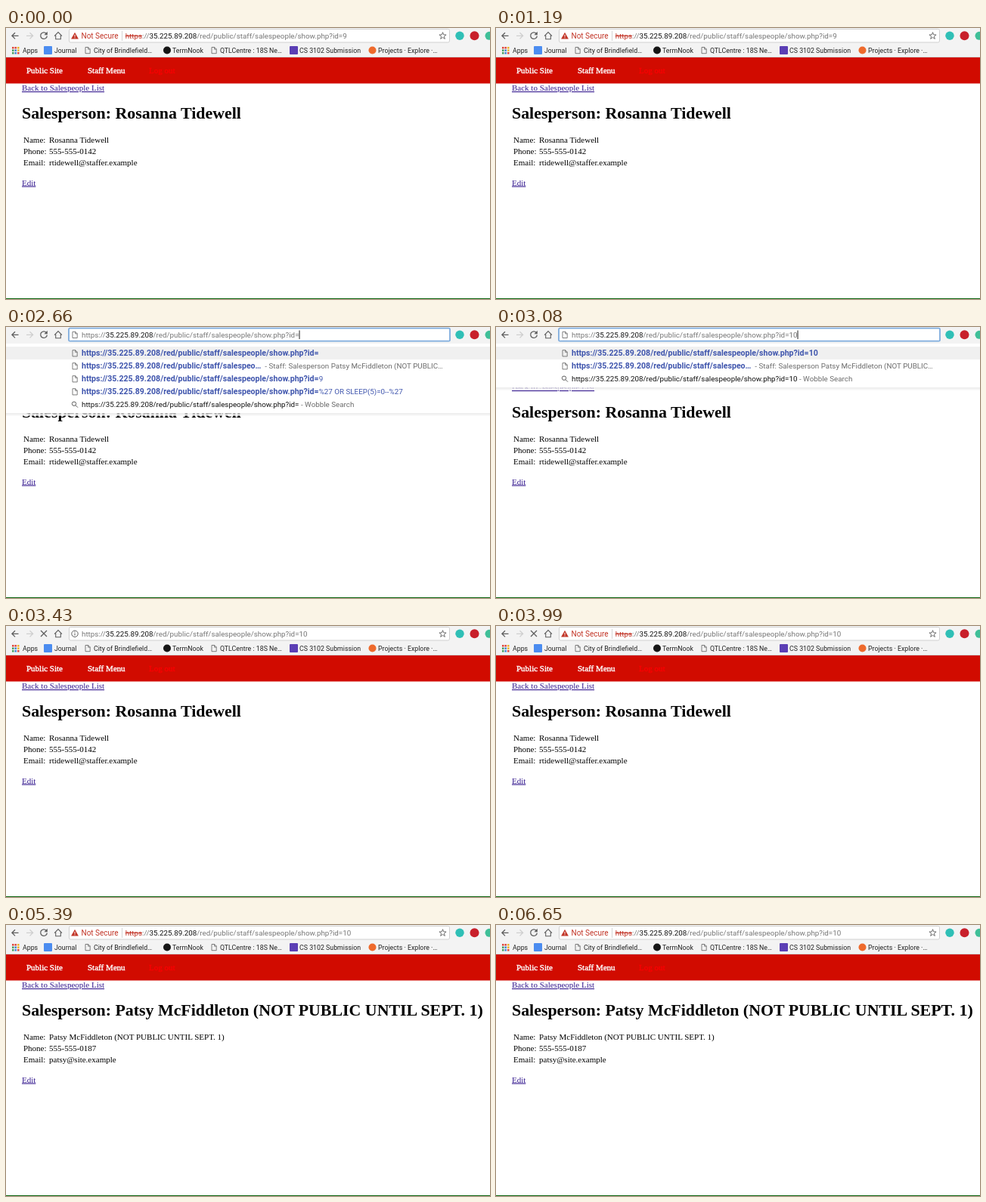
An HTML page for the animation above (6.72 s loop, 640x359 px).

```html
<!DOCTYPE html>
<html lang="en">
<head>
<meta charset="utf-8">
<title>Salesperson lookup</title>
<style>
  html, body { margin: 0; width: 100%; height: 100%; overflow: hidden; background: #fff; }
  svg { display: block; width: 100vw; height: 100vh; }
  text { white-space: pre; }
  .ui { font-family: Roboto, Inter, "Liberation Sans", sans-serif; font-size: 9.8px; }
  .mark { font-size: 8.8px; fill: #222; }
  .page { font-family: "Liberation Serif", "Noto Serif", serif; font-size: 11px; fill: #000; }
  .title { font-size: 21.9px; font-weight: bold; }
  .link { fill: #351a8f; text-decoration: underline; }
  .menu { fill: #fff; stroke: #fff; stroke-width: .4; }
  .hit { font-size: 10.6px; font-weight: bold; }
  .line { fill: none; stroke: #5f5f5f; stroke-width: 1.3; }
</style>
</head>
<body>
<svg viewBox="0 0 640 359" preserveAspectRatio="none">
  <rect width="640" height="359" fill="#fff"/>
  <g id="page"></g>
  <rect y="358" width="640" height="1" fill="#0c650f"/>
  <g id="chrome"></g>
</svg>
<script>
const LOOP = 6720;
const HOST = '35.225.89.208';
const FOLDER = '/red/public/staff/salespeople/';
const PATH = FOLDER + 'show.php?id=';
const BASE = 'https://' + HOST + PATH;

const people = [
  { name: 'Rosanna Tidewell', phone: '555-555-0142', email: 'rtidewell@staffer.example' },
  { name: 'Patsy McFiddleton (NOT PUBLIC UNTIL SEPT. 1)', phone: '555-555-0187', email: 'patsy@site.example' }
];

// Each step holds until the next one starts.
const steps = [
  { at: 0,    id: '9',  mode: 'insecure', person: 0 },
  { at: 1680, id: '9',  mode: 'insecure', person: 0, focus: true },
  { at: 2380, id: '',   mode: 'typing',   person: 0, focus: true },
  { at: 2870, id: '1',  mode: 'typing',   person: 0, focus: true },
  { at: 3010, id: '10', mode: 'typing',   person: 0, focus: true },
  { at: 3220, id: '10', mode: 'info',     person: 0, loading: true },
  { at: 3640, id: '10', mode: 'insecure', person: 0, loading: true },
  { at: 4480, id: '10', mode: 'insecure', person: 1 }
];

const text = (x, y, s, cls = 'ui', extra = '') =>
  `<text x="${x}" y="${y}" class="${cls}" ${extra}>${s}</text>`;
const span = (s, fill, extra = '') => `<tspan fill="${fill}" ${extra}>${s}</tspan>`;
const rect = (x, y, w, h, fill, extra = '') =>
  `<rect x="${x}" y="${y}" width="${w}" height="${h}" fill="${fill}" ${extra}/>`;
const dot = (x, y, r, fill) => `<circle cx="${x}" cy="${y}" r="${r}" fill="${fill}"/>`;
const line = (d, extra = '') => `<path class="line" d="${d}" ${extra}/>`;
const sheet = (x, y) =>
  line(`M${x - 3} ${y - 4}h3.8l2.4 2.4v5.8h-6.2zM${x + .6} ${y - 4}v2.6h2.6`, 'style="stroke-width:.8"');

function drawPage({ person }) {
  const { name, phone, email } = people[person];
  const rows = [['Name:', name], ['Phone:', phone], ['Email:', email]];
  return rect(0, 39, 640, 34.5, '#d10b00') +
    text(27, 60, 'Public Site', 'page menu') +
    text(108, 60, 'Staff Menu', 'page menu') +
    text(189, 60, 'Log out', 'page', 'style="fill:#fb0000;stroke:#fb0000;stroke-width:.3"') +
    text(21, 83, 'Back to Salespeople List', 'page link') +
    text(21, 119.5, 'Salesperson: ' + name, 'page title') +
    rows.map(([label, value], i) =>
      text(23, 152 + 15 * i, label, 'page') + text(57, 152 + 15 * i, value, 'page')).join('') +
    text(21, 208.5, 'Edit', 'page link');
}

function drawBookmarks() {
  const colours = ['#e0483e', '#e0483e', '#f0b429', '#4a9d5b', '#4285d8', '#f0b429', '#4a9d5b', '#4285d8', '#e0483e'];
  const grid = colours.map((c, i) =>
    rect(8 + i % 3 * 3.5, 25 + Math.floor(i / 3) * 3.5, 2.5, 2.5, c)).join('');
  const labels = [
    [22, 'Apps'], [64, 'Journal'], [116, 'City of Brindlefield…'], [220, 'TermNook'],
    [283, 'QTLCentre : 18S Ne…'], [388, 'CS 3102 Submission'], [492, 'Projects · Explore ·…']
  ];
  return rect(0, 20, 640, 19, '#f3f3f3') + rect(0, 38, 640, 1, '#d2cfcf') + grid +
    rect(50, 24, 11, 11, '#4b8cf0', 'rx="1"') +
    sheet(108, 29.5) + dot(213, 29.5, 5, '#161616') + sheet(275, 29.5) +
    rect(375, 24, 11, 11, '#5b3fb5', 'rx="1"') + dot(484.5, 29.5, 5, '#ee6a2c') +
    labels.map(([x, s]) => text(x, 32.7, s, 'ui mark')).join('');
}

function drawButtons(loading) {
  const reload = loading
    ? line('M46 6l8 8M54 6l-8 8')
    : line('M53.2 7.2a4.3 4.3 0 1 0 1.1 3.4') + '<path d="M54.8 4.8v4.4h-4.4z" fill="#5f5f5f"/>';
  return line('M16.5 10.3H8M12 6.2l-4.1 4.1 4.1 4.1') +
    line('M27 10.3h8.5M31.5 6.2l4.1 4.1-4.1 4.1', 'style="stroke:#cfcfcf"') + reload +
    line('M64 10.6l5-5 5 5M65.7 9.4v5.4h6.6v-5.4', 'style="stroke-width:1.1"');
}

function drawStatus(mode) {
  if (mode === 'typing') return sheet(91, 10.3);
  if (mode === 'info') {
    return line('M86.8 10.3a4.2 4.2 0 1 0 8.4 0a4.2 4.2 0 1 0 -8.4 0M91 9.6v3M91 7.4v1.2', 'style="stroke-width:1"');
  }
  return '<path d="M91 5.8l4.9 8.8h-9.8z" fill="#c23527"/>' +
    rect(90.5, 8.8, 1, 2.8, '#fff') + rect(90.5, 12.4, 1, 1, '#fff') +
    text(99.5, 13.7, 'Not Secure', 'ui', 'fill="#c23527" style="font-size:10px"') +
    rect(153, 4, 1, 13, '#d4d4d4');
}

function drawAddress({ id, mode, focus }) {
  const insecure = mode === 'insecure';
  const scheme = insecure
    ? span('https', '#c23527', 'text-decoration="line-through"') + span('://', '#777')
    : span('https://', '#777');
  const frame = focus
    ? rect(83, 1.7, 504, 17, '#fff', 'rx="1.5" stroke="#7fadde" stroke-width="1.8"')
    : rect(83.5, 1.5, 503, 17.5, '#fff', 'rx="2" stroke="#d0d0d0" stroke-width="1"');
  return frame + drawStatus(mode) +
    text(insecure ? 157.7 : 100, 13.7,
      scheme + span(HOST, '#111') + span(PATH + id, '#777'), 'ui', 'id="url"') +
    rect(0, 4.5, 1, 11.5, '#222', `id="caret" visibility="${focus ? 'visible' : 'hidden'}"`);
}

function drawStar() {
  const points = Array.from({ length: 10 }, (_, i) => {
    const r = i % 2 ? 2 : 4.8;
    const a = Math.PI * (i / 5 - .5);
    return [577.5 + r * Math.cos(a), 10.5 + r * Math.sin(a)].map(v => v.toFixed(2)).join(' ');
  });
  return line(`M${points.join('L')}Z`, 'style="stroke-width:.9"');
}

function drawSuggestions(id) {
  const blue = '#3f55ad';
  const bold = s => span(s, blue, 'class="hit"');
  const rows = [
    bold(BASE + id),
    bold('https://' + HOST + FOLDER.slice(0, -4) + '…') +
      span('  - Staff: Salesperson Patsy McFiddleton (NOT PUBLIC…', '#6c6c6c')
  ];
  if (!id) {
    rows.push(bold(BASE) + span('9', blue));
    rows.push(bold(BASE) + span('%27 OR SLEEP(5)=0--%27', blue));
  }
  rows.push(span(BASE + id, '#111') + span(' - Wobble Search', '#6c6c6c'));

  const bottom = 29.5 + rows.length * 17;
  const last = rows.length - 1;
  const icon = (y, i) => i < last ? sheet(91, y)
    : line(`M87.3 ${y - 1}a2.7 2.7 0 1 0 5.4 0a2.7 2.7 0 1 0 -5.4 0M92 ${y + 1}l3 3`, 'style="stroke-width:1"');
  return rect(0, 22, 640, bottom - 22, '#fff') +
    rect(0, bottom, 640, 1, '#dcdcdc') + rect(0, bottom + 1, 640, 2, '#f5f5f5') +
    rect(0, 26, 640, 17, '#f0f0f0') +
    rows.map((row, i) => icon(34.7 + 17 * i, i) + text(100, 38.2 + 17 * i, row)).join('');
}

function drawChrome(step) {
  const typing = step.mode === 'typing';
  return rect(0, 0, 640, 20, '#f3f3f3') + drawBookmarks() +
    (typing ? drawSuggestions(step.id) : '') +
    drawButtons(step.loading) + drawAddress(step) + (typing ? '' : drawStar()) +
    dot(600, 10.3, 5.7, '#2fbfb6') + dot(619.5, 10.3, 6, '#c8202b') + dot(639, 10.3, 5.5, '#3fbf98');
}

const byId = id => document.getElementById(id);
let shown;

function show(step) {
  byId('page').innerHTML = drawPage(step);
  byId('chrome').innerHTML = drawChrome(step);
  if (step.focus) {
    const url = byId('url');
    byId('caret').setAttribute('x', +url.getAttribute('x') + url.getComputedTextLength());
  }
  shown = step;
}

const start = performance.now();
function tick() {
  const t = (performance.now() - start) % LOOP;
  const step = steps.filter(s => s.at <= t).pop();
  if (step !== shown) show(step);
  requestAnimationFrame(tick);
}
tick();
</script>
</body>
</html>
```
